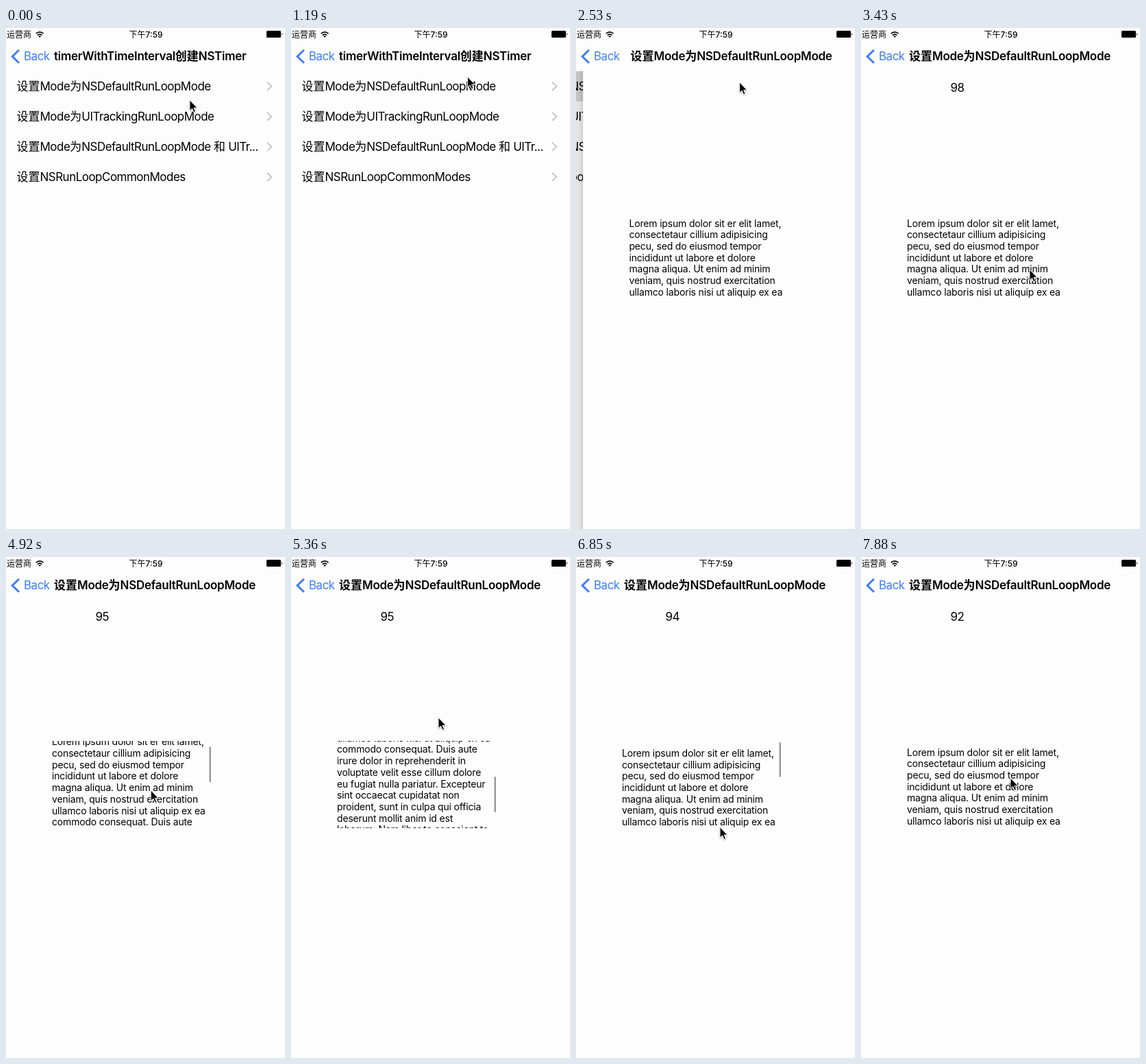
Animation of 407x730 px, one loop 8000 ms. Source, as an HTML page:

```html
<!DOCTYPE html>
<html lang="zh-CN">
<head>
<meta charset="utf-8">
<style>
  html, body { margin: 0; height: 100%; overflow: hidden; background: #fdfdfd; }
  svg { display: block; }
  text { font: 17px Inter, "Noto Sans CJK SC", sans-serif; letter-spacing: -.52px; }
  .cjk { letter-spacing: 0; }
  .title { font-weight: 600; letter-spacing: -.28px; }
  .body { font-size: 14px; letter-spacing: -.17px; }
  .status { font-size: 12px; letter-spacing: 0; }
  .clock { font-weight: 500; text-anchor: middle; }
  .blue { fill: #3f7df6; }
  .line { fill: none; }
</style>
</head>
<body>
<svg id="stage" width="407" height="730" viewBox="0 0 407 730"></svg>
<script>
const LOOP = 8000, TICK = 148.6;
const modes = ['设置Mode为NSDefaultRunLoopMode', '设置Mode为UITrackingRunLoopMode',
  '设置Mode为NSDefaultRunLoopMode 和 UITr...', '设置NSRunLoopCommonModes'];
const lorem = `Lorem ipsum dolor sit er elit lamet,
consectetaur cillium adipisicing
pecu, sed do eiusmod tempor
incididunt ut labore et dolore
magna aliqua. Ut enim ad minim
veniam, quis nostrud exercitation
ullamco laboris nisi ut aliquip ex ea
commodo consequat. Duis aute
irure dolor in reprehenderit in
voluptate velit esse cillum dolore
eu fugiat nulla pariatur. Excepteur
sint occaecat cupidatat non
proident, sunt in culpa qui officia
deserunt mollit anim id est
laborum. Nam liber te conscient to
factor tum poen legum odioque
civiudo`.split('\n');

const label = (x, y, str, attrs = '') => `<text x="${x}" y="${y}" ${attrs}>${
  str.replace(/[\u4e00-\u9fff]+/g, '<tspan class="cjk">$&</tspan>')}</text>`;
const row = (str, i) => label(15.5, 91 + 44 * i, str) +
  `<path class="line" d="M381 ${79 + 44 * i}l6.3 6l-6.3 6" stroke="#c7c7cc" stroke-width="2"/>`;

document.getElementById('stage').innerHTML = `
  <defs><linearGradient id="edge">
    <stop stop-opacity="0"/><stop offset="1" stop-opacity=".18"/>
  </linearGradient></defs>
  <g id="list">
    <rect id="pressed" y="63" width="407" height="44" fill="#d9d9d9"/>
    ${modes.map(row).join('')}
  </g>
  <rect id="dim" y="63" width="407" height="667"/>
  <g id="panel">
    <rect id="shadow" x="-7" y="63" width="7" height="667" fill="url(#edge)"/>
    <rect y="63" width="407" height="667" fill="#fdfdfd"/>
  </g>
  <g id="content">
    ${label(130.5, 93, '', 'id="counter"')}
    <svg x="67" y="268" width="232" height="127">
      <g id="copy">${lorem.map((s, i) => label(0, 21.5 + 16.7 * i, s, 'class="body"')).join('')}</g>
      <rect id="bar" x="229.5" width="2.5" rx="1.25" fill="#999"/>
    </svg>
  </g>
  ${label(26, 47, 'Back', 'id="oldBack" class="blue"')}
  ${label(26, 47, 'Back', 'id="newBack" class="blue"')}
  ${label(70, 47, 'timerWithTimeInterval创建NSTimer', 'id="oldTitle" class="title"')}
  ${label(70, 47, modes[0], 'id="newTitle" class="title"')}
  <path class="line" d="M19 32L9.3 41.5L19 51" stroke="#3f7df6" stroke-width="3"/>
  ${label(1, 14, '运营商', 'class="status"')}
  <path class="line" d="M43.8 8.2q5.4-4.8 10.8 0M46 10.6q3.2-2.8 6.4 0" stroke="#000" stroke-width="1.7"/>
  <path d="M47.4 12q1.8-1.4 3.6 0l-1.8 2z"/>
  ${label(204, 14, '下午7:59', 'class="status clock"')}
  <rect x="380" y="4" width="21" height="10" rx="1.5"/>
  <path d="M402 7.2q2 1.8 0 3.6z"/>
  <path id="cursor" d="M0 0V15.6L3.6 12.3L6 18L8.5 17L6.1 11.4H11Z" stroke="#fff"
    style="filter:drop-shadow(0 1px 1px #0005)"/>`;

const ui = {};
document.querySelectorAll('[id]').forEach(el => ui[el.id] = el);

// Pointer waypoints: tick, x, y
const route = [
  [0, 268, 105], [2, 268, 104], [3, 268, 104], [6, 265, 88], [8, 257.5, 71], [9.5, 246, 58],
  [11, 235, 77], [13, 238.5, 79], [18, 238.5, 79], [21, 271, 255], [23, 246, 352], [25, 212, 375],
  [28, 210, 375], [32, 210, 375], [36, 215, 234], [38, 217, 212], [39, 217, 212], [42, 204, 385],
  [43.5, 204, 444], [45, 206, 444], [47, 214, 343], [49, 216, 321], [50, 216, 321], [53, 218, 322]];
const GRAB_TICK = 32, GRAB_Y = 375, RELEASE = 44.5, LAG = .57, VIEW = 128, CONTENT = 300;

function pointer(k) {
  const i = Math.max(1, route.findIndex(p => p[0] >= k));
  const [a, b] = [route[i - 1], route[i]];
  const f = (k - a[0]) / (b[0] - a[0]);
  return [a[1] + (b[1] - a[1]) * f, a[2] + (b[2] - a[2]) * f];
}

// The text follows the pointer slightly late, with a rubber band past the top
function scrollAt(k) {
  if (k < GRAB_TICK) return 0;
  const pull = GRAB_Y - pointer(Math.min(k - LAG, RELEASE))[1];
  if (pull >= 0) return pull;
  const band = -VIEW * (1 - 1 / (1 - pull * .55 / VIEW));
  return k > RELEASE ? band * Math.exp(2 * (RELEASE - k)) : band;
}

function pushAt(k) {
  const s = Math.max(0, (k * TICK - 2148) * .0147);
  return k >= 18 ? 1 : 1 - (1 + s) * Math.exp(-s);
}

const place = (el, x, y = 0) => el.setAttribute('transform', `translate(${x} ${y})`);
const fade = (el, a) => el.setAttribute('opacity', Math.min(1, Math.max(0, a)));

function draw(now) {
  const k = Math.min(53, Math.floor(now % LOOP / TICK));
  const p = pushAt(k), scroll = scrollAt(k);

  fade(ui.pressed, k >= 12 ? 1 : 0);
  place(ui.list, -122 * p);
  fade(ui.dim, .1 * p);
  place(ui.panel, 407 * (1 - p));
  place(ui.content, 414 * (1 - p));
  fade(ui.shadow, p > 0 && p < 1 ? 1 - p / 2 : 0);

  place(ui.oldBack, -51 * p);
  fade(ui.oldBack, 1 - 1.7 * p);
  fade(ui.newBack, 2 * p - 1);
  place(ui.oldTitle, -33 * p);
  fade(ui.oldTitle, 1 - 1.5 * p);
  place(ui.newTitle, 380 * (1 - p));
  fade(ui.newTitle, p);

  // The countdown stalls while the text is being dragged
  const fires = Math.floor((k * TICK - 2600) / 500);
  ui.counter.textContent = fires < 0 ? '' : 99 - Math.min(fires, 4) - Math.max(0, fires - 7);

  place(ui.copy, 0, -scroll);
  ui.bar.setAttribute('y', 2 + Math.max(0, scroll) / CONTENT * 124);
  ui.bar.setAttribute('height', 52 + Math.min(0, scroll));
  fade(ui.bar, k > GRAB_TICK ? (49 - k) / 2 : 0);

  place(ui.cursor, ...pointer(k));
  requestAnimationFrame(draw);
}
requestAnimationFrame(draw);
</script>
</body>
</html>
```
